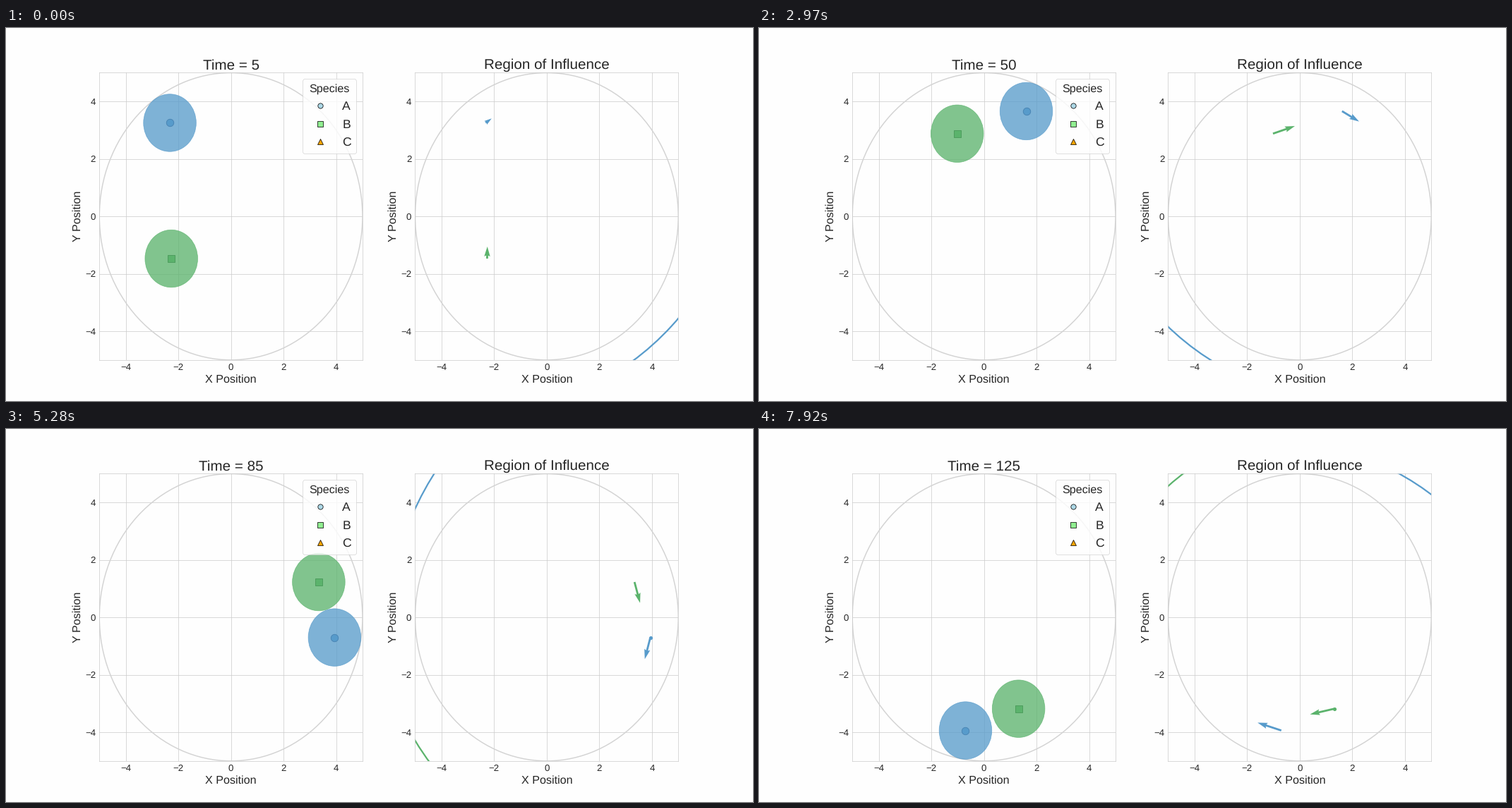
A matplotlib script for the animation above (8000 ms loop, 1058 by 529 pixels).

```python
import numpy as np
import matplotlib.pyplot as plt
from matplotlib.animation import FuncAnimation
from matplotlib.lines import Line2D

INTERVAL, FRAMES = 40, 200      # ms per tick, ticks per loop
STEP_MS, STEPS = 330, 25        # each simulation step stays 330 ms
ORBIT, REACH = 4, 10
RESTS = [6, 8, 11, 18, 21]      # steps in which B stands still

BLUE, GREEN = "#579bcb", "#5bb36c"

plt.rcParams.update({
    "font.family": "Liberation Sans", "text.hinting": "none",
    "text.color": "0.15", "axes.labelcolor": "0.15",
    "xtick.color": "0.15", "ytick.color": "0.15",
    "axes.edgecolor": "0.8", "axes.linewidth": 1,
    "axes.axisbelow": True, "axes.grid": True,
    "grid.color": "0.8", "grid.linewidth": 1,
    "xtick.major.size": 0, "ytick.major.size": 0,
    "xtick.major.pad": 7, "ytick.major.pad": 7,
    "xtick.labelsize": 18, "ytick.labelsize": 18,
    "axes.labelsize": 22, "axes.titlesize": 28, "axes.titlepad": 7,
})


def polar_path(degrees, radius):
    angle = np.radians(degrees)
    return np.column_stack([radius * np.cos(angle), radius * np.sin(angle)])


# A circles the arena clockwise, slowly at first
steps = np.arange(STEPS + 1)
path_a = polar_path(np.interp(steps, [0, 5, 9, 13, 24, 25],
                              [125.5, 105.8, 66.3, 23.7, -100.1, -113.6]), ORBIT)

# B follows a looser curve, advancing one unit of progress per step unless resting
progress = np.append(0, np.cumsum(~np.isin(steps[:-1], RESTS)))
keys = [0, 1, 2.5, 5, 6, 10, 11, 15, 20]
path_b = polar_path(
    np.interp(progress, keys, [213, 205, 176, 138.6, 125.5, 61.2, 44.6, -4.1, -83.4]),
    np.interp(progress, keys, [2.7, 2.49, 2.27, 2.58, 2.96, 3.34, 3.5, 3.61, 3.4]))

fig, (left, right) = plt.subplots(1, 2, figsize=(20, 10), dpi=52.9)
fig.set_facecolor("#fefefe")

for ax in (left, right):
    ax.set_facecolor("#fefefe")
    ax.set(xlim=(-5, 5), ylim=(-5, 5), xlabel="X Position", ylabel="Y Position",
           xticks=range(-4, 5, 2), yticks=range(-4, 5, 2))
    ax.add_patch(plt.Circle((0, 0), 5, fill=False, ec="lightgray", lw=2))

title = left.set_title("Time = 5")
right.set_title("Region of Influence")


def legend_key(marker, color, label):
    return Line2D([], [], ls="", marker=marker, mfc=color, mec="black",
                  mew=1, ms=10, label=label)


left.legend(handles=[legend_key("o", "lightblue", "A"),
                     legend_key("s", "lightgreen", "B"),
                     legend_key("^", "orange", "C")],
            title="Species", fontsize=24, title_fontsize=22, labelspacing=0.55,
            loc="upper right", frameon=True, framealpha=0.8)


class Agent:
    """One moving animal: its body on the left, its heading and reach on the right."""

    def __init__(self, path, color, edge, marker, dotted):
        self.path, self.dotted = path, dotted
        self.moves = np.diff(path, axis=0)
        self.body = left.add_patch(plt.Circle(path[0], 1, color=color, alpha=0.77, lw=1))
        self.mark, = left.plot([], [], marker, mfc=color, mec=edge, mew=1.2, ms=14.2)
        self.reach = right.add_patch(
            plt.Circle(path[0], REACH, fill=False, ec=color, lw=3))
        self.dot, = right.plot([], [], "o", color=color, ms=7, mew=0)
        self.arrows = [right.quiver(*p, *m, color=color, angles="xy",
                                    scale_units="xy", scale=1, visible=False)
                       for p, m in zip(path, self.moves)]

    def show(self, step):
        x, y = self.path[step]
        self.body.center = self.reach.center = x, y
        self.mark.set_data([x], [y])
        self.dot.set_data([x], [y])
        resting = not self.moves[step].any()
        self.dot.set_visible(resting or step in self.dotted)
        for i, arrow in enumerate(self.arrows):
            arrow.set_visible(i == step and not resting)


agents = [Agent(path_a, BLUE, "#4883b2", "o", range(13, 23)),
          Agent(path_b, GREEN, "#4a9a5b", "s", range(18, STEPS))]


def update(frame):
    step = min(STEPS - 1, ((frame + 1) * INTERVAL - 1) // STEP_MS)
    title.set_text(f"Time = {5 * (step + 1)}")
    for agent in agents:
        agent.show(step)
    return []


anim = FuncAnimation(fig, update, frames=FRAMES, interval=INTERVAL,
                     init_func=lambda: update(0), repeat=True, repeat_delay=0)
plt.show()
```
